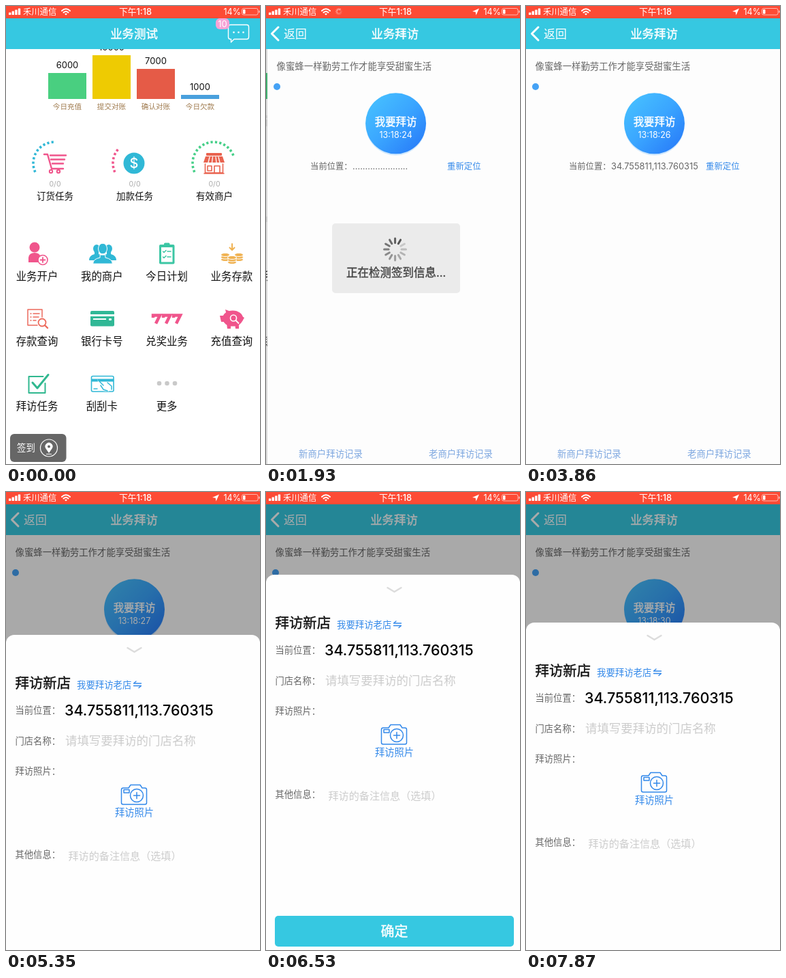
Recreate the animation shown at these times as an HTML page. Size 373 px wide and 670 px high, loop 8 s.

```html
<!DOCTYPE html>
<html lang="zh-CN">
<head>
<meta charset="utf-8">
<title>业务拜访</title>
<style>
html, body { margin: 0; width: 100%; height: 100%; overflow: hidden; background: #fff; }
svg { display: block; width: 100vw; height: 100vh; }
text { font-family: Inter, "Noto Sans CJK SC", "Noto Sans CJK", sans-serif; white-space: pre; stroke-width: 0; }
.semi { stroke-width: .4px; }
.line { fill: none; stroke: currentColor; stroke-linecap: round; stroke-linejoin: round; }
</style>
</head>
<body>
<svg id="stage" viewBox="0 0 373 670"></svg>
<script>
const CYAN = '#36c8e1', BLUE = '#3389ea', PINK = '#f0558c', SKY = '#30b8d6';
const COORDS = '34.755811,113.760315';

// Markup helpers
const text = (x, y, size, str, fill = '#111', anchor = 'start', more = '') =>
  `<text x="${x}" y="${y}" font-size="${size}" fill="${fill}" stroke="${fill}" text-anchor="${anchor}" ${more}>${str}</text>`;
const mid = (x, y, size, str, fill, more) => text(x, y, size, str, fill, 'middle', more);
const rect = (x, y, w, h, fill, r = 0, more = '') =>
  `<rect x="${x}" y="${y}" width="${w}" height="${h}" rx="${r}" fill="${fill}" ${more}/>`;
const dot = (x, y, r, fill) => `<circle cx="${x}" cy="${y}" r="${r}" fill="${fill}"/>`;
const ring = (x, y, r, color, w = 1.5, fill = 'none') =>
  `<circle cx="${x}" cy="${y}" r="${r}" fill="${fill}" stroke="${color}" stroke-width="${w}"/>`;
const oval = (x, y, rx, ry, fill, more = '') =>
  `<ellipse cx="${x}" cy="${y}" rx="${rx}" ry="${ry}" fill="${fill}" ${more}/>`;
const line = (d, color, w = 1.5) => `<path class="line" d="${d}" color="${color}" stroke-width="${w}"/>`;
const shape = (d, fill) => `<path d="${d}" fill="${fill}"/>`;
const group = (id, body) => `<g id="${id}">${body}</g>`;
const MEDIUM = 'font-weight="500"', SEMI = 'class="semi"';

function arc(cx, from, to, color, width, dash = 'none') {
  const at = a => `${cx + 31 * Math.cos(a * Math.PI / 180)} ${230 + 31 * Math.sin(a * Math.PI / 180)}`;
  return `<path d="M${at(from)}A31 31 0 ${+(to - from > 180)} 1 ${at(to)}" fill="none" stroke="${color}" stroke-width="${width}" stroke-dasharray="${dash}"/>`;
}

function spokes(inner, outer, width, color) {
  let out = '';
  for (let i = 0; i < 12; i++)
    out += `<path d="M0 ${-inner}V${-outer}" transform="rotate(${-30 * i})" stroke="${color}" stroke-width="${width}" stroke-linecap="round" opacity="${1 - 0.07 * i}"/>`;
  return out;
}

// Home screen
const bars = [
  [62, 98, '#49cf80', '6000', '今日充值'], [127, 72, '#eecb02', '10000', '提交对账'],
  [192, 92, '#e55b47', '7000', '确认对账'], [257, 130, '#49a0dd', '1000', '今日欠款']
].map(([x, y, color, value, label]) =>
  rect(x, y, 56, 136 - y, color) + mid(x + 28, y - 7, 13, value) + mid(x + 28, 150.5, 10.6, label, '#a07c50')).join('');

const gauges = [[71, 270, SKY, '订货任务'], [188, 222, PINK, '加款任务'], [305, 339, '#45cf88', '有效商户']];
const tracks = gauges.map(g => arc(g[0], 155, 385, '#ededed', 3)).join('');
const dials = gauges.map(([x, end, color, label]) =>
  arc(x, 155, end, color, 3.6, '3.2 3.2') + mid(x + 1, 264, 10.5, '0/0', '#aaa') + mid(x + 1, 283, 13.5, label)).join('');

const cart = line('M56 217h5l6 21h17M65 218.500h23M66 224.500h20M68 230.500h16', PINK, 2.4) +
  ring(66, 242, 2.2, PINK, 2) + ring(77, 242, 2.2, PINK, 2);
const coin = dot(188, 230, 15.5, SKY) + mid(188, 237, 20, '$', '#fff', MEDIUM);
const RED = '#e9634f';
const shop = rect(294, 215, 23, 4, RED, 1) + shape('M293 220h25l3 9h-31z', RED) +
  line('M299 221l-2 8M303.500 221l-1 8M308 221l1 8M312 221l2 8', '#fff', 1.3) +
  line('M292.500 231v13h26v-13M291 245h29M296 234h6v7h-6zM306 244v-10h8v10', RED, 1.6);

const seven = x => `<path d="M${x} 456v-3.500h10l-6 12" fill="none" stroke="${PINK}" stroke-width="4.5"/>`;
const stack = (x, y, n) => Array.from({ length: n }, (_, i) =>
  oval(x, y - 3.5 * i, 6.5, 2.6, '#f0b252', 'stroke="#fff"')).join('');
const person = (x, y, s) => oval(x, y, 5 * s, 6 * s, SKY) +
  shape(`M${x - 11 * s} ${y + 17 * s}q0-7 ${8 * s}-9v-4h${6 * s}v4q${8 * s} 2 ${8 * s} 9z`, SKY);

const icons = [
  ['业务开户', dot(42, 353, 7.5, PINK) + shape('M33 375v-7q1-7 9-7t9 7v7z', PINK) +
    ring(54, 371.5, 7, PINK, 1.6, '#fff') + line('M50.500 371.500h7M54 368v7', PINK, 1.8)],
  ['我的商户', person(133, 355, 1) + person(151, 355, 1) +
    `<g stroke="#fff" stroke-width="1">${person(142, 355, 1.3)}</g>`],
  ['今日计划', rect(225, 349, 22.5, 28.500, '#3cc6a4', 2) + rect(232, 346.500, 8.500, 5, '#3cc6a4', 1.5) +
    rect(228, 353, 16.500, 21.500, '#fff') + line('M230.500 359l1.500 1.500 3-3M237 359h5M230.500 367l1.500 1.500 3-3M237 367h5', '#3cc6a4')],
  ['业务存款', line('M332 348v8M328.500 353.500l3.500 3.500 3.500-3.500', '#f0b252', 2) +
    stack(322, 371, 3) + stack(342, 371, 3) + stack(332, 375, 3)],
  ['存款查询', line('M53 455v-11H32v23h14M36 450h1M40 450h9M36 455h1M40 455h8M36 460h1M40 460h4', '#ec6a5c') +
    ring(53, 463, 5.5, '#ec6a5c', 1.8, '#fff') + line('M57 467l4 4', '#ec6a5c', 2.4)],
  ['银行卡号', rect(124, 446, 35, 22.500, '#31b896', 2) + rect(124, 451, 35, 3, '#fff') +
    rect(128, 457, 19, 2, '#fff') + rect(151, 457, 4, 3, '#fff', 1)],
  ['兑奖业务', seven(216) + seven(231) + seven(246)],
  ['充值查询', oval(333, 457, 15, 11.5, PINK) +
    shape('M314 453h6v9h-4zM322 444l8 3-6 5zM324 464h6v8h-5zM336 464h6v8h-5zM345 453l5 3-3 5z', PINK) +
    ring(334, 456.500, 4.5, '#fff', 1.6) + line('M337.500 460l4 4', '#fff', 1.8)],
  ['拜访任务', line('M57.500 552v14H33.500v-24h21', '#30b88f', 2) + line('M39 551l7 8L62 539.500', '#30b88f', 3)],
  ['刮刮卡', rect(125.500, 541.500, 32.500, 22.500, 'none', 2, `stroke="${SKY}" stroke-width="1.600"`) +
    rect(126, 545.5, 32, 4, SKY) + shape('M134 546l9 8 6-4 6 5v6l-5 3-8-1-4-5z', '#fff') +
    line('M129 560h5M135 547l8 8M149 551l6 5v5M139 555l4 6 6 2', SKY, 1.5)],
  ['更多', [225, 236.500, 248].map(x => dot(x, 552, 3.3, '#c9c9c9')).join('')]
].map(([label, art], i) => art + mid(45.5 + 95.3 * (i % 4), 401 + 95 * Math.floor(i / 4), 15.4, label)).join('');

const signIn = rect(6, 626, 82.5, 41, '#666', 6) + text(16, 651, 13.4, '签到', '#fff') + ring(63, 646.5, 12.5, '#fff', 1.2) +
  shape('M63 654l-4.500-6.500a5.500 5.500 0 1 1 9 0z', '#fff') + line('M59.500 655.500h7', '#fff', 1.2) + dot(63, 644.5, 2, '#666');

const home = rect(0, 63, 373, 607, '#fff') +
  group('bands', rect(0, 160, 373, 16, '#ededed') + rect(0, 164, 373, 2, '#fff') + rect(0, 308, 373, 8, '#ededed') + tracks) +
  bars + dials + cart + coin + shop + icons + signIn +
  rect(0, 63, 373, 607, '#000', 0, 'id="shade"');

// Visit screen
const visit = rect(-7, 63, 7, 607, 'url(#edge)') + rect(0, 63, 373, 607, '#fdfdfd') +
  text(13.5, 92.500, 13.4, '像蜜蜂一样勤劳工作才能享受甜蜜生活', '#666') + dot(14, 118, 5, '#45a2f5') +
  dot(188.5, 174.5, 44, '#cfe8fd') + dot(188.5, 171.8, 44.5, 'url(#ball)') +
  mid(188.5, 175, 15.4, '我要拜访', '#fff', SEMI) + mid(188.5, 193, 12.5, '', '#fff', 'id="clock"') +
  text(63, 239, 12.3, '当前位置：', '#666') + text(125, 239, 12.8, '', '#666', 'start', 'id="place"') +
  text(264, 239, 12.4, '重新定位', BLUE) +
  text(46, 659.500, 13.4, '新商户拜访记录', '#7da7e0') + text(237, 659.500, 13.4, '老商户拜访记录', '#7da7e0') +
  group('popup', rect(95, 318, 188, 102, '#ebebeb', 5) +
    `<g transform="translate(187.5 356)"><g class="spin">${spokes(9.5, 16, 3, '#555')}</g></g>` +
    mid(189, 396, 16.5, '正在检测签到信息...', '#444', SEMI));

// Navigation and status bars
const nav = rect(0, 18, 373, 45, CYAN) +
  group('oldTitle', mid(188, 47, 17.4, '业务测试', '#fff', SEMI)) +
  group('chat', line('M329.500 27.500h24q3 0 3 3v15q0 3-3 3H335l-4.500 4.500v-4.500h-1q-3 0-3-3v-15q0-3 3-3z', '#fff', 1.4) +
    [334.500, 341.500, 348.500].map(x => dot(x, 38.500, 1.3, '#fff')).join('') +
    rect(308, 18, 20, 16, '#f7a3d6', 6) + mid(318, 30.500, 13, '10', '#fff')) +
  group('newTitle', mid(188, 47, 17.4, '业务拜访', '#fff', SEMI)) +
  group('back', line('M18 31l-9.500 9.500L18 50', '#fff', 3) + text(26, 46.500, 16.9, '返回', '#fff', 'start', 'font-weight="300"'));

const status = rect(0, 0, 373, 18, '#fd4b35') +
  [0, 1, 2, 3].map(i => rect(4 + 4.6 * i, 9.5 - 2 * i, 3.4, 3.5 + 2 * i, '#fff', .6)).join('') +
  text(25, 13, 12.3, '禾川通信', '#fff') +
  line('M82 7q6-5.500 12 0M84.500 9.500q3.500-3 7 0', '#fff', 2) + shape('M86 11.500q2-1.500 4 0l-2 2z', '#fff') +
  `<g id="busy" transform="translate(107 8)"><g class="spin">${spokes(2.4, 4.6, .9, '#fff')}</g></g>` +
  mid(190, 13, 12.8, '下午1:18', '#fff', MEDIUM) +
  group('arrow', shape('M313 3.500l-4.500 10-.8-4.700-4.700-.8z', '#fff')) +
  text(319.5, 13, 12.5, '14%', '#fff') +
  rect(346.500, 3.500, 23.500, 9.500, 'none', 2.5, 'stroke="#fff" stroke-opacity=".6"') +
  rect(348, 5, 3.5, 6.5, '#fff', 1) + rect(371, 6.500, 1.5, 3.5, '#fff', .7, 'opacity=".6"');

// Bottom sheet
const fields = [[236, '当前位置：'], [281, '门店名称：'], [325, '拜访照片：'], [447, '其他信息：']]
  .map(([y, label]) => text(13.5, y, 13.3, label, '#666')).join('');
const sheet = rect(0, 121, 373, 700, '#fefefe', 12) + line('M178.500 140l10 6 10-6', '#dcdcdc', 2.4) +
  text(13.5, 198.5, 20.4, '拜访新店', '#111', 'start', SEMI) + text(104, 198.500, 13.4, '我要拜访老店', BLUE) +
  line('M198.500 192h-11l3.500-3M187.500 195.500h11l-3.500 3', BLUE, 1.4) + fields +
  text(86, 238.500, 21.5, COORDS, '#000', 'start', MEDIUM) +
  text(87, 282, 17.45, '请填写要拜访的门店名称', '#ccc') + text(91.500, 450, 15.1, '拜访的备注信息（选填）', '#ccc') +
  line('M172 345h8l3-4.500h14l3 4.500h4q2.500 0 2.500 2.500v19q0 2.500-2.500 2.500h-32q-2.500 0-2.500-2.500v-19q0-2.500 2.500-2.500zM173 347.500h8v4.500h-8zM187.500 356h9M192 351.500v9', BLUE, 1.5) +
  ring(192, 356, 9.5, BLUE) + mid(188.5, 386, 14.3, '拜访照片', BLUE) +
  rect(13, 620, 351, 45, CYAN, 5) + mid(188.5, 650, 20, '确定', '#fff', SEMI);

stage.innerHTML = `<defs>
  <linearGradient id="ball" x1=".1" y1=".1" x2=".9" y2=".9"><stop stop-color="#46bfff"/><stop offset=".5" stop-color="#3aa5ff"/><stop offset="1" stop-color="#297ef9"/></linearGradient>
  <linearGradient id="edge"><stop stop-color="#000" stop-opacity="0"/><stop offset="1" stop-color="#000" stop-opacity=".12"/></linearGradient>
</defs>` + group('home', home) + group('visit', visit) + group('nav', nav) +
  rect(0, 18, 373, 652, '#000', 0, 'id="dim"') + group('sheet', sheet) + group('status', status);

const el = id => document.getElementById(id);
const move = (id, x, y = 0) => el(id).setAttribute('transform', `translate(${x} ${y})`);
const fade = (id, a) => el(id).setAttribute('opacity', Math.max(0, Math.min(1, a)));

function sheetOffset(n) {
  if (n < 24) return 560;
  if (n < 29) return 88 * Math.exp(-1.17 * (n - 25));
  return n < 38 ? 0 : 70 * ((n - 37) / 5) ** 1.5;
}

function draw(t) {
  const n = Math.floor((t - 1630) / 148); // motion advances in steps of 148 ms
  const p = n < 0 ? 0 : n > 2 ? 1 : 1 - 0.555 * Math.exp(-2.3 * n);

  move('home', -116 * p);
  move('visit', p ? 373 * (1 - p) : 390);
  fade('shade', 0.06 * p);
  fade('bands', +(t >= 300));

  fade('oldTitle', 1 - 2.3 * p);
  fade('chat', 1 - 1.2 * p);
  move('newTitle', 241 * (1 - p));
  fade('newTitle', p);
  fade('back', 2 * p - 1);

  fade('arrow', +(t >= 300));
  fade('busy', n >= 0 && n < 15 ? 0.8 : 0);
  fade('popup', (15 - n) / 3);
  document.querySelectorAll('.spin').forEach(s =>
    s.setAttribute('transform', `rotate(${30 * Math.floor((n - 8) * 1.776)})`));

  el('clock').textContent = '13:18:' + (24 + Math.floor((t - 1600) / 1000));
  el('place').textContent = n < 5 ? '.'.repeat(22) : COORDS;

  fade('dim', n < 24 ? 0 : n < 25 ? 0.2 : 0.335);
  move('sheet', 0, sheetOffset(n));
}

function tick() {
  draw(performance.now() % 8000);
  requestAnimationFrame(tick);
}
tick();
</script>
</body>
</html>
```
